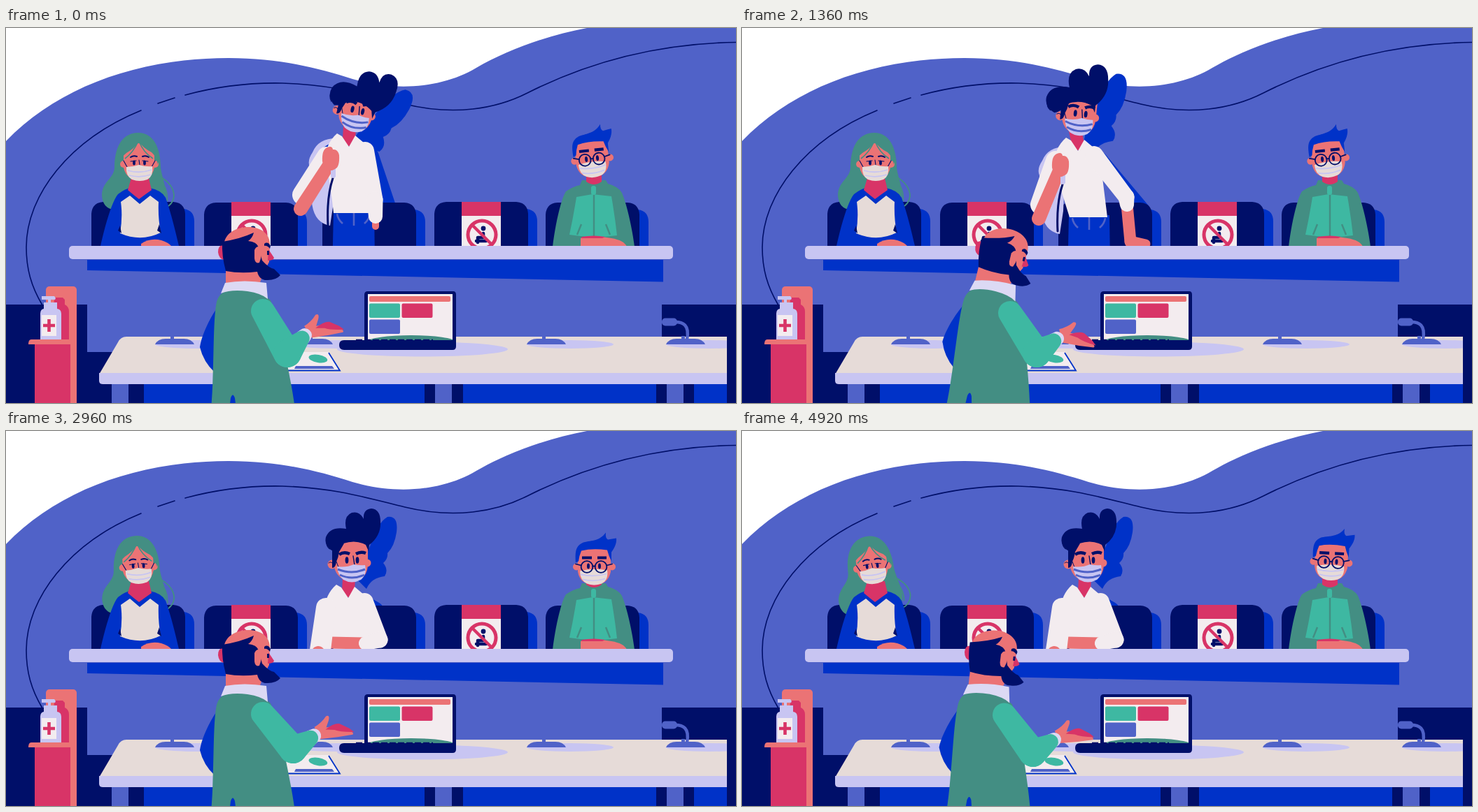
Recreate the animation shown at these times as an HTML page. Size 1043x537 px, loop 4960 ms.

```html
<!DOCTYPE html>
<html lang="en">
<head>
<meta charset="utf-8">
<title>Seminar room</title>
<style>
html, body { margin: 0; width: 100%; height: 100%; overflow: hidden; background: #fff; }
svg { display: block; width: 100%; height: 100%; }
.n { fill: #000f69 } .b { fill: #0032c8 } .p { fill: #5062c8 } .l { fill: #c8c5f2 }
.c { fill: #e6dbd8 } .w { fill: #f3ecef } .s { fill: #eb7375 } .r { fill: #d83467 }
.g { fill: #438e83 } .t { fill: #3eb8a2 } .d { fill: #dcd9f4 }
.ln { fill: none; stroke: #000f69; stroke-linecap: round; stroke-linejoin: round }
</style>
</head>
<body>
<svg viewBox="0 0 1043 537" preserveAspectRatio="none">
<defs>
  <clipPath id="seat"><path d="M0 0H1043V320H0Z"/></clipPath>
  <clipPath id="screen"><path d="M517 381H638V447H517Z"/></clipPath>
  <clipPath id="desk"><path d="M133 440H1030V494H133Z"/></clipPath>
  <g id="chair">
    <path class="b" d="M20 63V10H132Q147 12 147 28V63Z"/>
    <path class="n" d="M0 63V17Q1 1 17 0H117Q133 1 134 17V63Z"/>
  </g>
  <g id="sign">
    <path class="w" d="M0 0H56V63H0Z"/><path class="r" d="M0 0H56V20H0Z"/>
    <circle class="n" cx="31" cy="38" r="3.4"/>
    <path class="ln" stroke-width="4.5" d="M31 45V51H23V58M35 56H21"/>
    <circle cx="29" cy="47" r="20" fill="none" stroke="#d83467" stroke-width="5"/>
    <path d="M15 33L43 61" stroke="#d83467" stroke-width="4.5"/>
  </g>
  <g id="base">
    <ellipse class="l" cx="62" cy="12" rx="62" ry="6"/>
    <path class="p" d="M0 12Q4 4 15 4H41Q52 4 56 12ZM22 0H27V5H22Z"/>
  </g>
</defs>

<path class="p" d="M0 162C75 84 190 43 318 43C390 43 445 57 495 73C560 92 625 85 672 57C715 32 775 10 830 0H1043V537H0Z"/>
<path class="ln" stroke-width="1.6" d="M52 397C36 370 29 345 29 314C29 240 90 160 193 118M217 108L241 100M256 96C300 84 345 78 395 79C470 81 520 97 570 109C640 126 700 116 745 93C830 50 930 22 1043 20.5"/>
<path class="n" d="M0 396H116V464H200V505H937V396H1043V537H0Z"/>

<g class="b" clip-path="url(#seat)">
  <path id="bodyShade"/>
  <path id="hairShade" d="M545 123Q561 121 558 145Q555 165 545 175Q546 183 539 189Q547 199 541 208Q522 210 515 226L503 214Q508 185 520 165Q530 132 545 123Z"/>
</g>
<use href="#chair" x="122" y="249"/><use href="#chair" x="283" y="250"/><use href="#chair" x="452" y="250"/>
<use href="#chair" x="612" y="249"/><use href="#chair" x="771" y="250"/>
<use href="#sign" x="322" y="249"/><use href="#sign" x="651" y="249"/>

<!-- woman on the left -->
<g id="girlHair">
  <path class="g" d="M189 150C165 150 155 172 155 200C154 216 137 220 137 240C138 255 148 262 158 259L222 257C236 240 224 222 221 200C221 172 211 150 189 150Z"/>
  <path d="M219 212Q240 224 240 241Q238 254 226 258M219 216Q232 230 230 248" fill="none" stroke="#438e83" stroke-width="1.8"/>
</g>
<path class="b" d="M135 312C140 290 150 250 160 238Q170 230 178 229H205Q222 232 228 243C236 265 243 295 247 312Z"/>
<path class="c" d="M164 249L177 240L191 252L206 240L218 249Q217 272 221 293Q193 307 163 294Q167 270 164 249Z"/>
<path class="r" d="M179 215H204L208 232Q198 239 190 245Q182 239 174 232Z"/>
<path class="n" d="M163 283L165 294L160 290ZM219 281L222 294L216 290Z"/>
<path class="s" d="M193 309Q206 300 222 304Q232 307 237 313H193Z"/>
<g id="girl">
  <circle class="s" cx="168" cy="195" r="5"/><circle class="s" cx="213" cy="195" r="5"/>
  <path class="s" d="M168 180Q189 150 212 180V200Q208 218 190 219Q172 217 168 200Z"/>
  <path class="g" d="M160 196C158 170 170 153 189 152C208 153 220 170 217 196Q215 184 208 178Q196 172 190 163Q184 172 172 179Q163 186 160 196Z"/>
  <path d="M189 162Q182 178 170 187M190 162Q196 178 210 187" fill="none" stroke="#438e83" stroke-width="1.6"/>
  <path class="ln" stroke-width="2" d="M178 185Q182 182 187 184M195 184Q200 182 204 185"/>
  <g id="girlEyes" class="n"><ellipse cx="183" cy="193" rx="1.9" ry="3.6"/><ellipse cx="198" cy="193" rx="1.9" ry="3.6"/></g>
  <path class="ln" stroke-width="1.1" d="M178 191L186 190M195 190L203 191M190 189L191 196M168 190L173 199M213 190L208 199"/>
  <path class="c" d="M172 199Q181 199 190 196Q200 199 209 198Q211 212 202 217Q191 221 180 217Q171 212 172 199Z"/>
  <path d="M174 204Q191 209 208 203M176 211Q191 215 207 210" fill="none" stroke="#c8c5f2" stroke-width="1.8"/>
</g>

<!-- man on the right -->
<path class="g" d="M781 313C785 280 793 245 800 234Q810 227 820 225L823 218H857L860 223Q875 227 880 236C888 255 895 290 898 313Z"/>
<path class="r" d="M829 208H851V220Q840 228 829 220Z"/>
<path class="t" d="M815 242L838 238L865 241Q870 270 873 297Q840 302 805 296Q811 268 815 242Z"/>
<path d="M840 238V299M822 281L816 296M857 281L863 296" stroke="#438e83" stroke-width="2.4"/>
<rect class="t" x="836" y="226" width="7" height="13" rx="3"/>
<path class="s" d="M821 301Q840 296 865 301Q883 304 887 313H821Z"/>
<path class="r" d="M823 299Q840 296 856 299L852 301H822Z"/>
<g id="man">
  <circle class="s" cx="815" cy="188" r="5"/><circle class="s" cx="866" cy="188" r="5"/>
  <path class="s" d="M817 162H864V195Q860 214 840 214Q820 213 817 195Z"/>
  <path class="b" d="M814 182C813 165 814 158 825 153C838 150 848 151 857 139Q856 147 860 149Q866 148 872 147C873 155 868 163 865 167V180Q861 172 859 164Q838 161 822 165Q819 172 818 180Z"/>
  <path d="M823 175H837M845 175H858" stroke="#000f69" stroke-width="4.2"/>
  <g id="manEyes" class="n"><ellipse cx="832" cy="187" rx="2" ry="4"/><ellipse cx="848" cy="187" rx="2" ry="4"/></g>
  <path class="c" d="M820 194Q840 189 859 193Q861 207 851 212Q840 216 830 212Q820 207 820 194Z"/>
  <path d="M821 199Q840 203 858 198M824 206Q840 210 856 205" fill="none" stroke="#c8c5f2" stroke-width="1.8"/>
  <g class="ln" stroke-width="1.8"><circle cx="830" cy="188" r="8.4"/><circle cx="850" cy="188" r="8.4"/><path d="M838 187H842M822 186L814 184M858 186L866 184"/></g>
</g>

<!-- student in the middle -->
<g clip-path="url(#seat)">
  <g id="bag">
    <path class="l" d="M472 158Q446 158 438 178Q430 190 434 199L437 250Q440 279 463 283L468 250Z"/>
    <path class="b" d="M469 164Q452 168 445 182Q440 192 442 200L459 190Z"/>
  </g>
  <g id="jeans">
    <path class="b" d="M468 262H526L528 400H465Z"/>
    <path d="M473 266Q474 274 481 280M520 266Q519 274 512 280M497 264V283" fill="none" stroke="#5062c8" stroke-width="2.6"/>
  </g>
  <path id="neck" class="r"/>
  <path id="shirt" class="w"/>
  <path id="skinR" class="s"/><path id="handR" class="s"/>
  <path id="upR" class="w"/><path id="lowR" class="w"/>
  <path id="upL" class="w"/>
  <path id="cord" class="ln" stroke-width="3"/>
  <path id="skinL" class="s"/>
  <g id="fist">
    <path class="l" d="M0 8H7V26Q3 30 0 26Z"/>
    <path class="s" d="M-12 4Q-13 -13 -5 -16Q2 -19 3 -13Q10 -14 12 -5Q13 12 6 15Q-2 20 -9 14Z"/>
  </g>
  <g id="head">
    <circle class="s" cx="467" cy="190" r="6.5"/><circle class="s" cx="517" cy="188" r="5.5"/>
    <path class="s" d="M469 165Q492 148 518 163V192Q516 213 495 215Q474 212 470 194Z"/>
    <path class="n" d="M467 195L467 160H484L477 172Q476 180 473 186Q472 195 467 195Z"/>
    <path class="ln" stroke-width="1" d="M473 186L476 194M462 188Q465 185 468 189"/>
    <path d="M477 176Q484 171 492 175M501 175Q508 171 515 174" fill="none" stroke="#000f69" stroke-width="4.4"/>
    <g id="headEyes" class="n"><ellipse cx="488" cy="184" rx="2.4" ry="4.8"/><ellipse cx="503" cy="184" rx="2.4" ry="4.8"/></g>
    <path class="ln" stroke-width="1.4" d="M497 178L499 191"/>
    <path class="l" d="M474 193Q487 195 498 190Q507 192 514 191Q517 205 508 212Q495 219 483 212Q475 205 474 193Z"/>
    <path d="M475 197Q495 205 514 197M478 205Q495 213 513 205" fill="none" stroke="#5062c8" stroke-width="3"/>
  </g>
  <g id="hair">
    <path class="n" d="M467 172Q454 165 457 152Q463 136 486 140Q482 122 494 117Q505 114 511 126Q510 112 522 111Q535 112 535 130Q536 150 519 163L518 172L514 163Q500 155 482 161Q478 170 467 172Z"/>
    <path class="ln" stroke-width="1" d="M459 156Q456 164 462 169"/>
  </g>
</g>

<rect class="l" x="90" y="312" width="863" height="19" rx="5"/>
<path class="b" d="M116 332H939V363.5L116 347Z"/>

<!-- dispenser -->
<rect class="s" x="57" y="370" width="44" height="180" rx="5"/>
<path class="r" d="M41 453H92V537H41ZM69 391V386H81L84 389V396Q90 399 90 406V446H66V400Z"/>
<path class="s" d="M36 446H101V453H32Q32 446 36 446Z"/>
<path class="l" d="M51 384H69Q72 387 70 389H64V393H73V402Q79 403 79 409V446H49V409Q49 403 54 402V393H60V389H51Z"/>
<path class="w" d="M51 411H72V441H51Z"/>
<path d="M53 426H70M61.5 417V435" stroke="#d83467" stroke-width="4.6"/>

<!-- front desk -->
<path class="b" d="M197 510H598V537H197ZM653 510H929V537H653ZM983 510H1030V537H983Z"/>
<path class="p" d="M151 510H175V537H151ZM613 510H637V537H613ZM944 510H968V537H944Z"/>
<path class="c" d="M172 442H1030V496H133L160 450Q164 442 172 442Z"/>
<path class="l" d="M133 494H1030V510H138Q133 510 133 505Z"/>
<g clip-path="url(#desk)">
  <use href="#base" x="213" y="441"/><use href="#base" x="411" y="441"/>
  <use href="#base" x="744" y="441"/><use href="#base" x="943" y="441"/>
  <ellipse class="l" cx="595" cy="460" rx="122" ry="10.5"/>
</g>
<path d="M973 446C977 425 967 421 956 421" fill="none" stroke="#5062c8" stroke-width="4.5"/>
<rect class="p" x="937" y="415.5" width="22" height="11" rx="5"/>
<path class="w" d="M385 464H461L478 491H385Z"/>
<path d="M461 465L477 490.5H385" fill="none" stroke="#0032c8" stroke-width="1.8"/>
<ellipse class="t" cx="446" cy="473.5" rx="13.5" ry="5.5" transform="rotate(10 446 473)"/>
<path class="p" d="M414 484H466L469 488H412Z"/>
<path class="n" d="M517 377H639Q643 377 643 382V456Q643 461 638 461H483Q476 461 476 454Q476 447 483 447H512V382Q512 377 517 377Z"/>
<g clip-path="url(#screen)">
  <path class="w" d="M517 381H638V447H517Z"/>
  <ellipse class="g" cx="579" cy="449" rx="62" ry="9"/>
  <rect class="s" x="519" y="384" width="116" height="8" rx="2"/>
  <rect class="t" x="519" y="394.5" width="44" height="20.5" rx="2"/>
  <rect class="r" x="565.5" y="394.5" width="44" height="20.5" rx="2"/>
  <rect class="p" x="519" y="417.5" width="44" height="20.5" rx="2"/>
</g>
<path d="M500 446.5H610" stroke="#000f69" stroke-width="1.6" stroke-dasharray="9 3"/>

<!-- lecturer -->
<g id="lean">
  <path class="b" d="M302 400C285 425 278 448 277 457Q282 478 298 493Z"/>
  <g id="skull">
    <path class="r" d="M312 312Q303 309 303 321Q304 331 312 332Z"/>
    <path class="s" d="M312 306C316 290 335 284 350 285C368 287 377 297 377 310L376 335L368 350L361 370H314V345Z"/>
    <path class="r" d="M375 317L383 329Q382 333 374 333Z"/>
    <path class="n" d="M309 306Q335 302 354 293Q352 301 346 305Q358 306 361 314L366 333Q376 344 383 345Q388 350 392 354Q386 361 374 361Q362 362 359 349Q335 352 314 348Q308 326 309 306Z"/>
    <path class="s" d="M355 318Q358 311 364 314Q367 324 362 336Q356 338 355 330Z"/>
    <path class="n" d="M369 309Q374 305 378 312L377 316Q373 311 369 312ZM373 319H376V325H373Z"/>
  </g>
  <path class="g" d="M293 545C298 490 295 420 301 392Q305 378 318 376C345 372 365 377 378 390C392 430 405 490 413 545V570H332L327 530Q324 521 321 530L316 570H292Z"/>
  <path class="d" d="M307 380L313 365Q340 360 372 365L374 388Q365 380 345 377Q322 374 307 380Z"/>
</g>
<g id="palm">
  <path class="s" d="M-5 -9Q5 -15 11 -25Q17 -28 15 -19L12 -9Q30 -13 46 -6Q53 -2 50 0Q28 5 4 8Z"/>
  <path class="r" d="M11 -6Q23 -16 31 -15L45 -9L52 -4Q32 -3 24 -6Z"/>
</g>
<path id="cuff" class="d"/><path id="upper" class="t"/><path id="fore" class="t"/>
</svg>

<script>
const LOOP = 4960, STEP = 40;
const $ = id => document.getElementById(id);
const set = (id, d) => $(id).setAttribute('d', d);
const move = (id, s) => $(id).setAttribute('transform', s);
const ease = k => k * k * (3 - 2 * k);
const ramp = (t, from, to) => ease(Math.max(0, Math.min(1, (t - from) / (to - from))));

// Point at a fractional position along a few key points.
function along(k, ...pts) {
  const i = Math.min(Math.floor(k), pts.length - 2);
  return pts[i].map((v, j) => v + (pts[i + 1][j] - v) * (k - i));
}

// Outline of a limb with a radius at each end.
function limb(id, [x1, y1], r1, [x2, y2], r2) {
  const d = Math.hypot(x2 - x1, y2 - y1) || 1, a = Math.atan2(y2 - y1, x2 - x1);
  const b = Math.acos(Math.max(-1, Math.min(1, (r1 - r2) / d)));
  const pt = (x, y, r, q) => `${x + r * Math.cos(q)} ${y + r * Math.sin(q)}`;
  const arc = (r, big) => `A${r} ${r} 0 ${+big} 0 `;
  set(id, `M${pt(x1, y1, r1, a + b)}L${pt(x2, y2, r2, a + b)}${arc(r2, b > Math.PI / 2)}${pt(x2, y2, r2, a - b)}` +
    `L${pt(x1, y1, r1, a - b)}${arc(r1, b < Math.PI / 2)}${pt(x1, y1, r1, a + b)}Z`);
}

function blink(id, t, y, ...times) {
  const near = Math.min(...times.map(c => Math.abs(t - c)));
  const k = Math.max(.13, Math.min(1, (near - 40) / 80));
  move(id, `translate(0 ${y * (1 - k)}) scale(1 ${k})`);
}

// Shirt hung between the collar point and the hem.
function shirt(x, y, hemX, hemY, half) {
  set('shirt', `M${x - 17} ${y - 19}L${x - 10} ${y - 15}L${x} ${y}L${x + 9} ${y - 16}L${x + 22} ${y - 5}` +
    `Q${x + 30} ${y + 2} ${x + 32} ${y + 14}L${hemX + half} ${hemY}H${hemX - half}` +
    `Q${x - 27} ${(y + hemY) / 2} ${x - 34} ${y + 20}Q${x - 34} ${y - 4} ${x - 17} ${y - 19}Z`);
}

function student(t) {
  // Prop a hand on the table, sit down, fold the arms.
  const prop = ramp(t, 600, 1150), sit = ramp(t, 1400, 1990), fold = ramp(t, 2350, 2800);
  const stage = prop + sit + fold, propped = prop * (1 - sit);
  const [x, y] = along(stage, [490, 170], [480, 176], [489, 239], [489, 239]);
  const off = (dx, dy) => [x + dx, y + dy];

  const [hx, hy] = off(-5 * propped, -23);
  move('head', `translate(${hx} ${hy}) rotate(${13 * (1 - prop) + 6 * propped}) translate(-490 -215)`);
  const locks = `translate(${off(21 - 23 * prop + 8 * sit, -83 - 8 * (prop + sit))}) ` +
    `rotate(${20 * (1 - prop)}) scale(${1.13 - .13 * sit}) translate(-495 -140)`;
  move('hair', locks);
  move('hairShade', locks);
  limb('neck', [hx + 1, hy - 6], 9, off(0, -10), 9);
  limb('bodyShade', off(30, 14), 13, along(stage, [545, 262], [569, 262], [590, 266], [526, 258]), 14);

  const drop = 6 * prop + 42 * sit;
  shirt(x, y, 497 - 2 * prop, 265 + drop, 29 - 2 * prop);
  move('jeans', `translate(${-prop} ${drop})`);
  move('bag', `translate(${-9 * prop} ${12 * prop + 165 * sit})`);

  const fist = [464 - 9 * prop, 187 + 9 * prop + 150 * sit];
  const elbowL = [421 + 3 * prop + 22 * sit, 259 + 14 * prop + 45 * sit];
  limb('upL', off(-32, 14), 14, [elbowL[0] + 3, elbowL[1] - 20 + 16 * sit], 15);
  limb('skinL', elbowL, 10, [fist[0] - 2, fist[1] + 8], 9);
  move('fist', `translate(${fist})`);
  set('cord', `M${fist[0] + 3} ${fist[1] + 28}q-9 27 -7 67`);

  const elbow = along(stage, [527, 246], [549, 242], [568, 250], [534, 299]);
  const cuff = along(stage, [528, 270], [550, 253], [555, 268], [514, 304]);
  const hand = along(stage, [528, 284], [555, 306], [516, 304], [463, 303]);
  const r = 5 + 3.5 * prop;
  limb('upR', off(23, 6), 13, elbow, 11.5);
  limb('lowR', elbow, 11.5, cuff, 10);
  limb('skinR', cuff, r, hand, r);
  limb('handR', hand, r, [hand[0] + 22 * propped, hand[1] + 3 * propped], r - 2);
  blink('headEyes', t, 184, 480, 3560);
}

function lecturer(t) {
  const back = ramp(t, 1700, 2180), lean = ramp(t, 40, 470) - back + .5 * ramp(t, 3450, 4420);
  move('lean', `rotate(${lean * 6.4} 352 537)`);
  move('skull', `rotate(${lean * (5 + 2 * ramp(t, 1000, 1360))} 340 365)`);

  // Forearm and palm angles swing through a few gestures.
  const swings = ramp(t, 40, 480) + ramp(t, 900, 1320) + ramp(t, 1680, 2200) +
    ramp(t, 2450, 2900) + ramp(t, 3060, 3520) + ramp(t, 3800, 4450);
  const [arm, palm] = along(swings, [-46, 0], [-46, -22], [-36, 19], [-58, -38], [-33, 2], [-50, -12], [-32, 4]);
  const elbow = [402 + 19 * lean + 8 * back * (1 - lean), 466 - 10 * back * (1 - lean)];
  const at = d => [elbow[0] + d * Math.cos(arm * Math.PI / 180), elbow[1] + d * Math.sin(arm * Math.PI / 180)];
  limb('upper', [367 + 16 * lean, 405 + 3 * lean], 17, elbow, 20);
  limb('fore', elbow, 20, at(30), 11);
  limb('cuff', at(30), 11, at(36), 10);
  move('palm', `translate(${at(42)}) rotate(${palm})`);
}

function audience(t) {
  const tilt = `rotate(${-6.5 * ramp(t, 2650, 3480)} 190 232)`;
  move('girl', tilt);
  move('girlHair', tilt);
  const turn = -6 * (1 - ramp(t, 1720, 2150)) + 3 * ramp(t, 3900, 4400);
  const nod = 6.5 * (ramp(t, 2500, 2850) - ramp(t, 3000, 3400));
  move('man', `translate(0 ${nod}) rotate(${turn} 840 215)`);
  blink('girlEyes', t, 193, 560, 1960);
  blink('manEyes', t, 187, 600, 4720);
}

function tick() {
  const t = Math.floor(performance.now() % LOOP / STEP) * STEP;
  student(t);
  lecturer(t);
  audience(t);
  requestAnimationFrame(tick);
}
tick();
</script>
</body>
</html>
```
